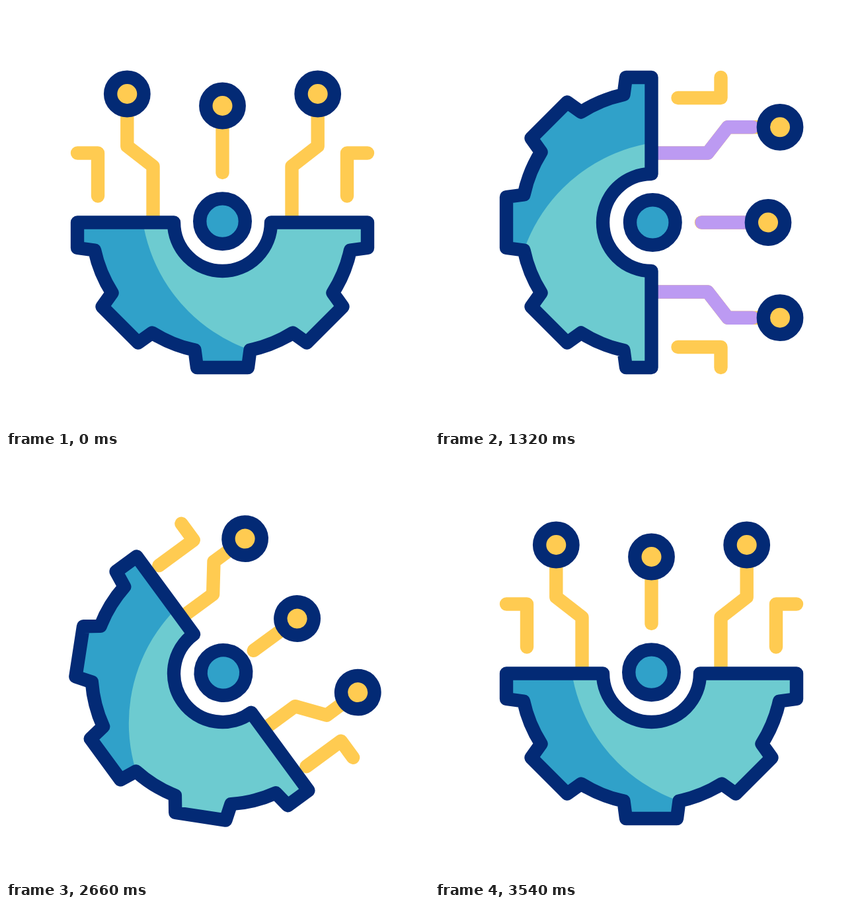
An HTML page that plays this animation: 640x640 px, repeating every 3600 ms.

```html
<!DOCTYPE html>
<html lang="en">
<head>
<meta charset="utf-8">
<title>Gear circuit</title>
<style>
  html, body { margin: 0; width: 100%; height: 100%; overflow: hidden; background: #fff; }
  svg { display: block; width: 100vw; height: 100vh; }
  .line { fill: none; stroke: #ffcb51; }
  .pulse { fill: none; stroke: #bc9af2; }
  .ring { stroke: #032a75; }
</style>
</head>
<body>
<svg viewBox="0 0 640 640">
  <defs>
    <path id="gear" d="M327.5 254V108H289L285.5 134A198 198 0 0 0 221 160.5L200 145.5L145.500 200L160.500 221A198 198 0 0 0 134.500 285.500L108 289V366L134.500 369.500A198 198 0 0 0 160.500 434L145.500 455L200 509.500L221 494.500A198 198 0 0 0 285.500 521L289 547H327.500V401A73.500 73.500 0 0 1 327.500 254Z"/>
    <clipPath id="body"><use href="#gear"/></clipPath>
  </defs>
  <g id="icon" stroke-width="20.4" stroke-linecap="round" stroke-linejoin="round">
    <g id="wires"></g>
    <use href="#gear" fill="#30a1c9"/>
    <circle cx="367" cy="450" r="246" fill="#6dcbd0" clip-path="url(#body)"/>
    <use href="#gear" fill="none" class="ring"/>
    <circle class="ring" cx="329.3" cy="327.5" r="34.3" fill="#30a1c9"/>
  </g>
</svg>
<script>
  const LOOP = 3600;
  const MIRROR = 'translate(0 655) scale(1 -1)';

  // data-pull: how far a part slides toward the gear when fully retracted
  const wire = (d, pull) => `<g data-pull="${pull}">
    <path class="line" d="${d}"/><path class="pulse" pathLength="1" d="${d}"/></g>`;
  const node = (x, y, pull) =>
    `<circle class="ring" data-pull="${pull}" cx="${x}" cy="${y}" r="25.2" fill="#ffcb51"/>`;

  const side = `
    <path class="line" data-pull="52" d="M367.5 139H432.500V108"/>
    ${wire('M328 222.500H412.500L443 183.300H490', 64)}
    ${node(522, 183.3, 115)}`;

  document.getElementById('wires').innerHTML = `
    <g>${side}</g>
    <g transform="${MIRROR}">${side}</g>
    ${wire('M403 327.500H480', 42)}
    ${node(504, 327.5, 90)}`;

  const icon = document.getElementById('icon');
  const sliders = [...document.querySelectorAll('[data-pull]')];
  const pulses = document.querySelectorAll('.pulse');

  const ease = (t, from, to) => {
    const p = Math.min(1, Math.max(0, (t - from) / (to - from)));
    return p * p * (3 - 2 * p);
  };

  const PULSE = { start: 1134, end: 2202, period: 534, head: 217, tail: 167 };

  function drawPulse(t) {
    const on = t > PULSE.start && t < PULSE.end;
    const local = (t - PULSE.start) % PULSE.period;
    const head = ease(local, 0, PULSE.head);
    const tail = ease(local, PULSE.tail, PULSE.period);
    for (const p of pulses) {
      p.style.display = on && head > tail ? '' : 'none';
      p.setAttribute('stroke-dasharray', `${Math.max(0, head - tail)} 3`);
      p.setAttribute('stroke-dashoffset', -tail);
    }
  }

  function draw(t) {
    const turnIn = ease(t, 100, 600);
    const turnOut = ease(t, 2400, 3000);
    const retract = turnIn - ease(t, 600, 1134) + turnOut - ease(t, 3000, 3535);
    icon.setAttribute('transform', `rotate(${-90 * (1 - turnIn + turnOut)} 327.5 327.5)`);
    for (const s of sliders) {
      s.setAttribute('transform', `translate(${-s.dataset.pull * retract} 0)`);
    }
    drawPulse(t);
  }

  const begin = performance.now();
  function tick() {
    draw((performance.now() - begin) % LOOP);
    requestAnimationFrame(tick);
  }
  draw(0);
  requestAnimationFrame(tick);
</script>
</body>
</html>
```
